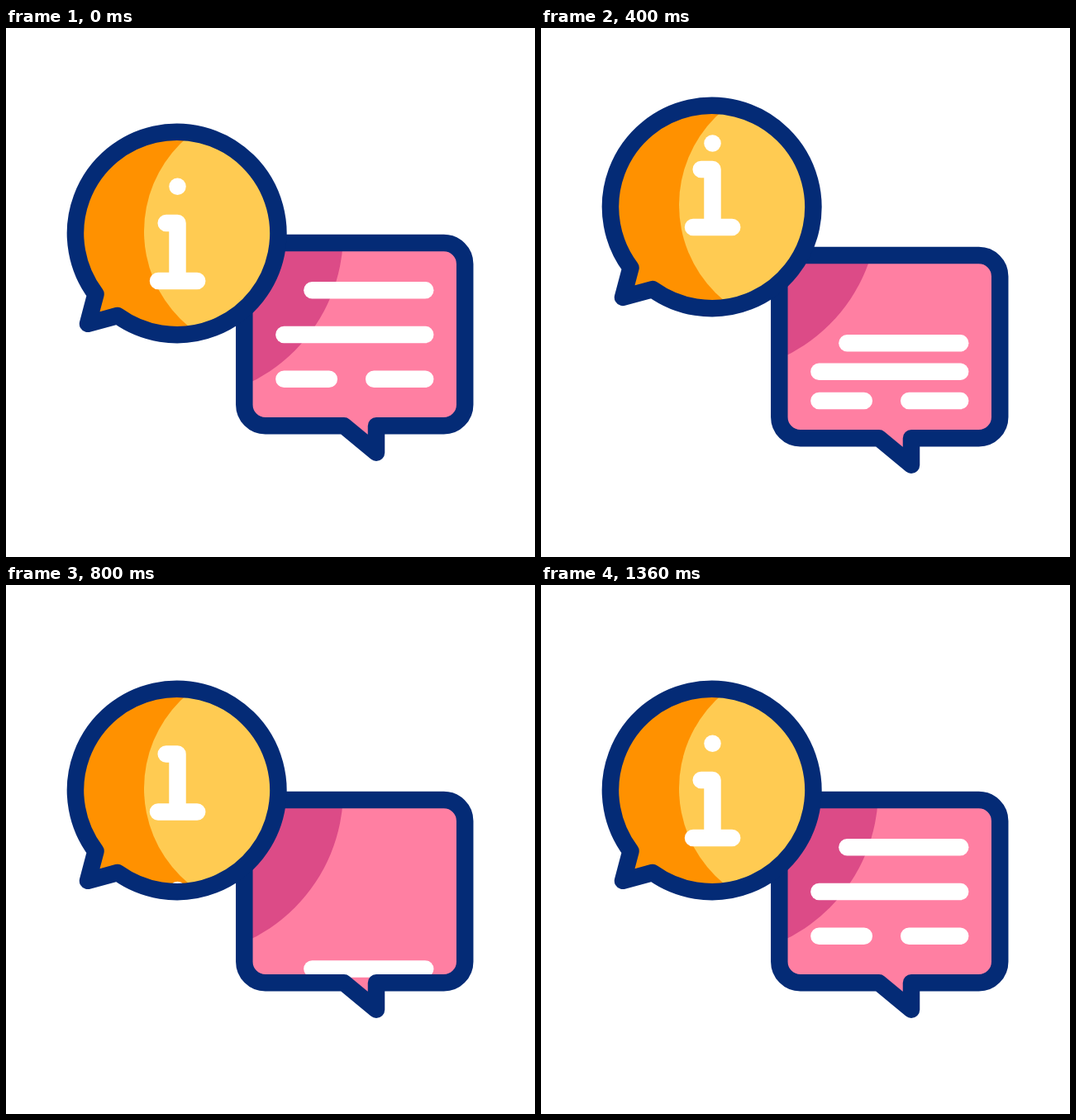
These frames come from a looping animation (640 by 640 pixels, 1480 ms). An HTML page:

```html
<!DOCTYPE html>
<html lang="en">
<head>
<meta charset="utf-8">
<title>Info chat</title>
<style>
  html, body { margin: 0; width: 100%; height: 100%; overflow: hidden; background: #fff; }
  svg { display: block; width: 100vw; height: 100vh; }
  .line { fill: none; stroke: #042b76; stroke-width: 20.5; stroke-linejoin: round; }
  .ink path { fill: none; stroke: #fff; stroke-width: 20.5; stroke-linecap: round; stroke-linejoin: round; }
</style>
</head>
<body>
<svg viewBox="0 0 640 640">
  <defs>
    <path id="box" d="M313.8 260H529.7a25.5 25.5 0 0 1 25.5 25.5V455.8a25.5 25.5 0 0 1-25.5 25.5H448V513.7L409 481.3H313.8a25.5 25.5 0 0 1-25.5-25.5V285.5a25.5 25.5 0 0 1 25.5-25.5Z"/>
    <path id="disc" d="M135 348A122.7 122.7 0 1 0 108.5 322L99 357.8Z"/>
    <clipPath id="boxClip"><use href="#box"/></clipPath>
    <clipPath id="discClip"><use href="#disc"/></clipPath>
  </defs>
  <g id="note">
    <use href="#box" fill="#ff7fa2"/>
    <g clip-path="url(#boxClip)">
      <circle id="shade" cx="207.5" cy="248.7" r="200.5" fill="#dc4b87"/>
      <g id="bars" class="ink"></g>
    </g>
    <use href="#box" class="line"/>
  </g>
  <g id="info">
    <use href="#disc" fill="#ff9100"/>
    <g clip-path="url(#discClip)">
      <circle cx="317" cy="246" r="150" fill="#ffcb52"/>
      <g id="letter" class="ink"></g>
    </g>
    <use href="#disc" class="line"/>
  </g>
</svg>
<script>
  const LOOP = 1480, STEP = 40;
  const $ = id => document.getElementById(id);
  const smooth = x => x * x * (3 - 2 * x);

  // Eased value at time t from [time, value] keys
  function track(keys, t) {
    if (t <= keys[0][0]) return keys[0][1];
    for (let i = 1; i < keys.length; i++) {
      const [t0, a] = keys[i - 1], [t1, b] = keys[i];
      if (t < t1) return a + (b - a) * smooth((t - t0) / (t1 - t0));
    }
    return keys[keys.length - 1][1];
  }

  const shift = (el, y) => el.setAttribute('transform', `translate(0 ${y.toFixed(2)})`);

  const infoKeys = [[103, 0], [320, -69], [516, 33], [720, 0]];
  const noteKeys = [[80, 0], [320, 37], [520, -25.5], [720, 0]];

  // Each part swings to `swing`, leaves to `exit`, and a copy arrives from `from` at `start`
  const parts = [
    { host: 'letter', d: 'M193.7 236H207.5V306M184 306H231.2', swing: -46, exit: 254, from: -208, start: 438 },
    { host: 'letter', d: 'M207.5 191.7h.01', swing: -31, exit: 216, from: -174, start: 580 },
    { host: 'bars', d: 'M370.4 317.2H507.2', swing: 63, exit: -262, from: 262, start: 580 },
    { host: 'bars', d: 'M336.4 371H507.2', swing: 41, exit: -223, from: 218, start: 720 },
    { host: 'bars', d: 'M336.4 424.8H390.8M445.2 424.8H507.2', swing: 21, exit: -207, from: 207, start: 860 }
  ];

  function addPath(host, d) {
    const el = document.createElementNS('http://www.w3.org/2000/svg', 'path');
    el.setAttribute('d', d);
    return $(host).appendChild(el);
  }

  const movers = parts.flatMap(p => [
    { el: addPath(p.host, p.d), keys: [[80, 0], [320, p.swing], [960, p.exit]] },
    { el: addPath(p.host, p.d), keys: [[p.start, p.from], [p.start + 480, 0]] }
  ]);

  function draw(now) {
    const t = Math.floor((now % LOOP) / STEP) * STEP;
    const infoY = track(infoKeys, t), noteY = track(noteKeys, t);
    shift($('info'), infoY);
    shift($('note'), noteY);
    shift($('shade'), infoY - noteY);
    for (const m of movers) shift(m.el, track(m.keys, t));
  }

  const begin = performance.now();
  function tick() {
    draw(performance.now() - begin);
    requestAnimationFrame(tick);
  }
  tick();
</script>
</body>
</html>
```
